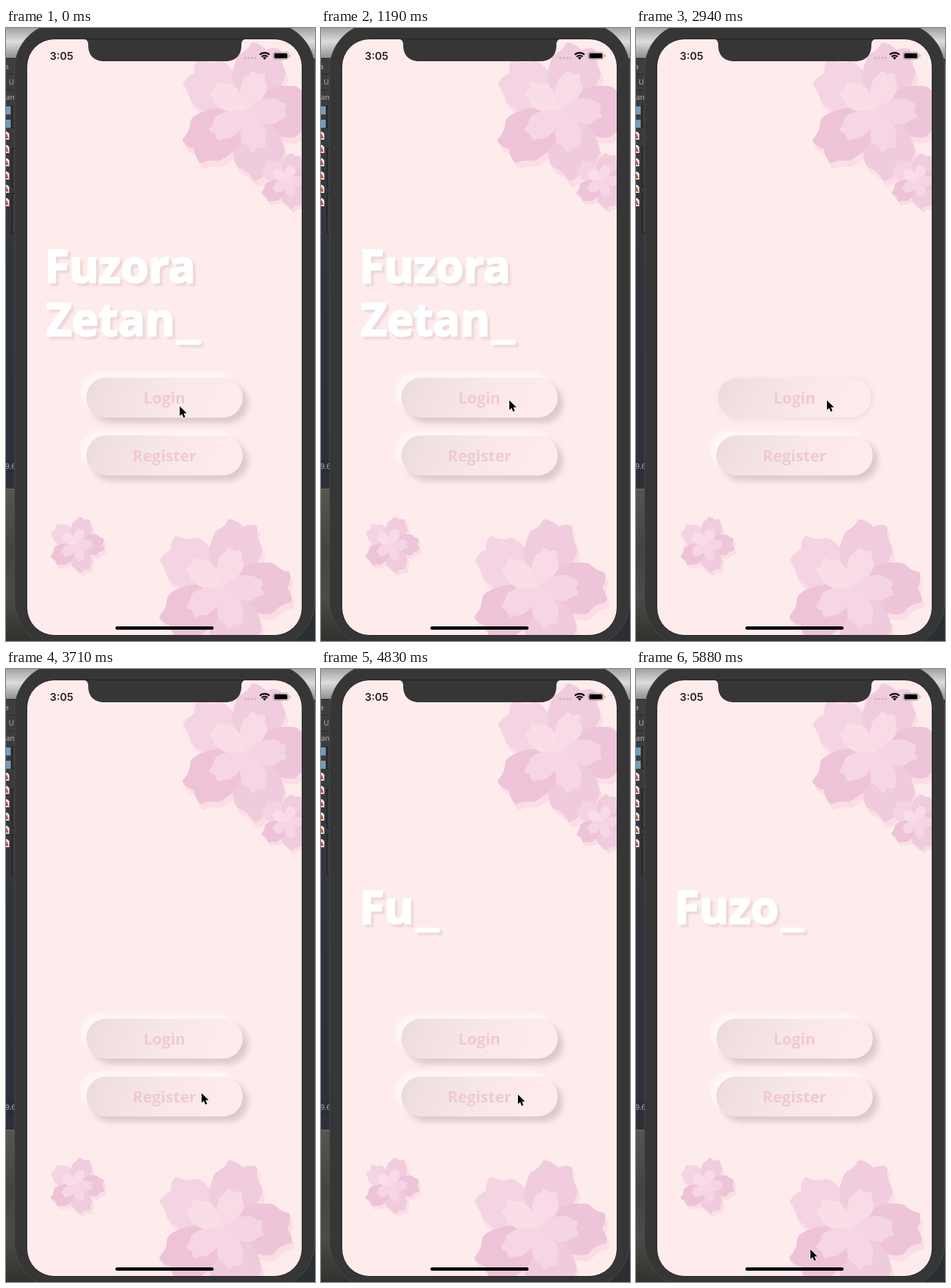
Animation of 466 by 922 pixels, one loop 5950 ms. Source, as an HTML page:

```html
<!DOCTYPE html>
<html lang="en">
<head>
<meta charset="utf-8">
<title>Welcome screen</title>
<style>
html, body { margin: 0; width: 100%; height: 100%; overflow: hidden; background: #2b2e33; }
svg { display: block; width: 100vw; height: 100vh; }
text { font-family: "Open Sans", "Noto Sans", sans-serif; }
.side { font: 11px Inter, sans-serif; fill: #b6b9bb; }
.title { font-size: 68px; font-weight: 700; fill: #fff; stroke: #fff; stroke-width: 2.4; stroke-linejoin: round; }
.label { font-size: 23.4px; font-weight: 700; fill: #efcad2; text-anchor: middle; }
</style>
</head>
<body>
<svg viewBox="0 0 466 922" preserveAspectRatio="none">
  <defs>
    <linearGradient id="wall" x2="0" y2="1">
      <stop stop-color="#a2a2a2"/><stop offset=".45" stop-color="#dcdcdc"/><stop offset="1" stop-color="#8d8d8d"/>
    </linearGradient>
    <linearGradient id="editor" x2="0" y2="1">
      <stop stop-color="#3c3f41"/><stop offset=".5" stop-color="#30343b"/><stop offset="1" stop-color="#2b303a"/>
    </linearGradient>
    <linearGradient id="rock" x2="0" y2="1">
      <stop stop-color="#55564f"/><stop offset=".4" stop-color="#42443d"/><stop offset=".7" stop-color="#4b4c45"/><stop offset="1" stop-color="#30322e"/>
    </linearGradient>
    <linearGradient id="pill" x2="1" y2=".1">
      <stop stop-color="#e9d9d9"/><stop offset=".13" stop-color="#f0dfdf"/><stop offset=".38" stop-color="#f5e4e4"/>
      <stop offset=".58" stop-color="#fae8e8"/><stop offset="1" stop-color="#feebeb"/>
    </linearGradient>
    <filter id="soft" x="-20%" y="-60%" width="140%" height="220%"><feGaussianBlur stdDeviation="5"/></filter>
    <filter id="glow" x="-20%" y="-60%" width="140%" height="220%"><feGaussianBlur stdDeviation="2.5"/></filter>
    <filter id="lift" x="-10%" y="-20%" width="125%" height="150%">
      <feDropShadow dx="4" dy="4" stdDeviation="1.6" flood-color="#e6d0d1" flood-opacity=".75"/>
    </filter>
    <clipPath id="screen"><rect x="32" y="17" width="414" height="896" rx="41"/></clipPath>
    <path id="petal" d="M0 0C14 -18 32 -38 56 -39C68 -39 74 -40 79 -36C86 -30 90 -27 99 -26C104 -22 101 -8 97 -1C104 6 106 16 103 20C94 22 86 25 80 33C74 41 64 39 54 37C32 32 14 16 0 0Z"/>
  </defs>

  <rect width="466" height="922" fill="#2b2e33"/>
  <rect width="466" height="46" fill="url(#wall)"/>
  <rect y="45" width="20" height="648" fill="url(#editor)"/>
  <path d="M0 45.5H14M0 69.5H14M0 93.5H14M0 651.5H14M0 667.5H14" stroke="#25282a"/>
  <rect y="694" width="60" height="228" fill="url(#rock)"/>
  <path d="M0 693.5H14" stroke="#777"/>
  <g class="side">
    <text x="-2" y="62">a</text><text x="4" y="85">U</text><text x="0" y="108">am</text><text x="-1" y="663">9.6</text>
  </g>
  <path d="M0 118H7V130H0ZM0 138H7V150H0Z" fill="#6f9fbd"/>
  <g id="files"></g>
  <path d="M9 117h6v33h-6zM9 181h6v58h-6zM9 249h6v59h-6zM463 180h3v99h-3z" fill="#3a3a3a" stroke="#151515"/>

  <rect x="13" y="-8" width="452.5" height="940" rx="70" fill="#363636" stroke="#4b4b4b"/>
  <rect x="31.5" y="16.5" width="415" height="897" rx="41.5" fill="#feecec" stroke="#222"/>

  <g clip-path="url(#screen)">
    <g id="flowers"></g>
    <path d="M116 16C122 17 124 20 124 26C124 41 133 50 148 50H331C346 50 355 41 355 26C355 20 357 17 363 16Z" fill="#363636"/>
  </g>

  <text x="66" y="47.5" style="font:600 16px Inter,sans-serif" fill="#2b2021">3:05</text>
  <path d="M361 45h.01M366 45h.01M371 45h.01M376 45h.01" stroke="#d2b6c3" stroke-width="3.6" stroke-linecap="round"/>
  <g fill="none" stroke="#100c0d" stroke-width="2.3">
    <path d="M382.7 40.2A10.5 10.5 0 0 1 397.3 40.2M385.4 43.3A6.6 6.6 0 0 1 394.6 43.3"/>
    <path d="M387.3 44.8A4 4 0 0 1 392.7 44.8L390 47.8Z" fill="#100c0d" stroke="none"/>
  </g>
  <rect x="403" y="36.5" width="23" height="10.5" rx="3" fill="none" stroke="#a69299"/>
  <rect x="404.6" y="38" width="19.8" height="7.6" rx="1.7" fill="#000"/>
  <path d="M427.7 40v4q1.4 -.5 1.4 -2t-1.4 -2" fill="#a69299"/>

  <g filter="url(#lift)">
    <text id="line0" class="title" x="58" y="383"></text>
    <text id="line1" class="title" x="60" y="463"></text>
    <rect id="caret" width="37" height="7.5" rx="1.5" fill="#fff"/>
  </g>

  <g id="buttons"></g>
  <rect x="165" y="900" width="148" height="5" rx="2.5" fill="#050303"/>

  <g id="ring" fill="none">
    <circle r="20" stroke="#fff" stroke-width="4.5" opacity=".5"/>
    <circle r="20" stroke="#000" stroke-width="2.8"/>
  </g>
  <path id="mouse" d="M0 0V14.6L3.4 11.4L5.7 17L8.3 15.9L6 10.4H10.6Z" fill="#000" stroke="#fff" stroke-width="1.2" paint-order="stroke"/>
</svg>
<script>
const LOOP = 5950, STEP = 70;
const WORDS = ["Fuzora", "Zetan"];
const $ = id => document.getElementById(id);

function drawFiles() {
  let out = "";
  for (let y = 156; y < 262; y += 20)
    out += `<path d="M-3 ${y}h5l3 3v9h-8z" fill="#e8e4e2"/><path d="M-2 ${y + 7}l3 -4l3 7h-6z" fill="#c2493f"/>`;
  $("files").innerHTML = out;
}

function flower(x, y, scale, turn = 0) {
  const outer = ["#f4d4e3", "#f0ccde", "#eec4d8", "#f0cadd", "#eec3d8"];
  const inner = ["#f9deE8", "#f8dbe6", "#f5d4e3", "#f6d6e4", "#f6d6e4"];
  const ring = (fill, size = "1") => outer.map((_, i) =>
    `<use href="#petal" fill="${fill[i] || fill[0]}" transform="rotate(${i * 72 - 143}) scale(${size})"/>`).join("");
  return `<g transform="translate(${x} ${y}) scale(${scale}) rotate(${turn})">
    <g transform="translate(${scale < 1 ? "9 13" : "4 9"})" opacity=".75">${ring(["#fbd9e4"])}</g>
    ${ring(outer)}${ring(inner, ".59 .5")}</g>`;
}

function button(y, label) {
  const pill = extra => `<rect x="-118" y="-30" width="236" height="60" rx="30" ${extra}/>`;
  const g = document.createElementNS("http://www.w3.org/2000/svg", "g");
  g.setAttribute("transform", `translate(239 ${y})`);
  g.innerHTML = pill('fill="#fff6f6" filter="url(#glow)"') + pill('fill="#d6c2c4" filter="url(#soft)"') +
    pill('fill="url(#pill)"') + `<text class="label" y="8.5">${label}</text>`;
  $("buttons").append(g);
  const [light, dark, face] = g.children;
  return p => {
    const size = 1 - .022 * p, off = 9 - 7 * p;
    light.setAttribute("transform", `translate(${-off} ${-off + 1}) scale(${size})`);
    dark.setAttribute("transform", `translate(${off - 1} ${off - 1}) scale(${size})`);
    dark.setAttribute("opacity", .85 - .25 * p);
    face.setAttribute("transform", `scale(${size})`);
  };
}

const ease = (t, a, b) => {
  const k = Math.min(1, Math.max(0, (t - a) / (b - a)));
  return k * k * (3 - 2 * k);
};

// [start, end, x, y]: each row moves the pointer to a new place
const moves = [[350, 900, 284, 560], [1250, 1500, 288, 560], [3080, 3560, 295, 638],
  [4410, 4620, 297, 640], [5040, 5600, 263, 873]];
function pointer(t) {
  let x = 262, y = 569;
  for (const [a, b, nx, ny] of moves) {
    const k = ease(t, a, b);
    x += (nx - x) * k;
    y += (ny - y) * k;
  }
  return [x, y];
}

function typing(t) {
  if (t < 2650) return [11, t < 2400 && Math.floor((t + 100) / 500) % 2 === 0];
  if (t < 3900) return [0, false];
  return [1 + Math.floor((t - 3900) / 500), true];
}

drawFiles();
$("flowers").innerHTML = flower(362, 125, 1) + flower(424, 230, .405) + flower(106, 777, .405) + flower(327, 842, 1);
const pressLogin = button(556, "Login"), pressRegister = button(643, "Register");

function render(t) {
  const [count, caretOn] = typing(t);
  const split = WORDS[0].length;
  $("line0").textContent = WORDS[0].slice(0, count);
  $("line1").textContent = WORDS[1].slice(0, Math.max(0, count - split));
  const row = count > split ? 1 : 0, line = $("line" + row);
  const caret = $("caret");
  caret.style.display = caretOn ? "" : "none";
  if (caretOn) {
    caret.setAttribute("x", +line.getAttribute("x") + line.getComputedTextLength() + 2);
    caret.setAttribute("y", 389 + row * 80);
  }

  pressLogin(ease(t, 2520, 2700) - ease(t, 2940, 3120));
  pressRegister(ease(t, 3850, 3990) - ease(t, 4060, 4270));

  const [x, y] = pointer(t);
  $("mouse").setAttribute("transform", `translate(${x} ${y})`);
  const down = (t >= 2450 && t < 2700) || (t >= 3780 && t < 3990);
  $("ring").style.display = down ? "" : "none";
  $("ring").setAttribute("transform", `translate(${x + 1} ${y + 2})`);
}

const begin = performance.now();
function tick() {
  const t = (performance.now() - begin) % LOOP;
  render(Math.floor(t / STEP) * STEP);
  requestAnimationFrame(tick);
}
render(0);
requestAnimationFrame(tick);
</script>
</body>
</html>
```
